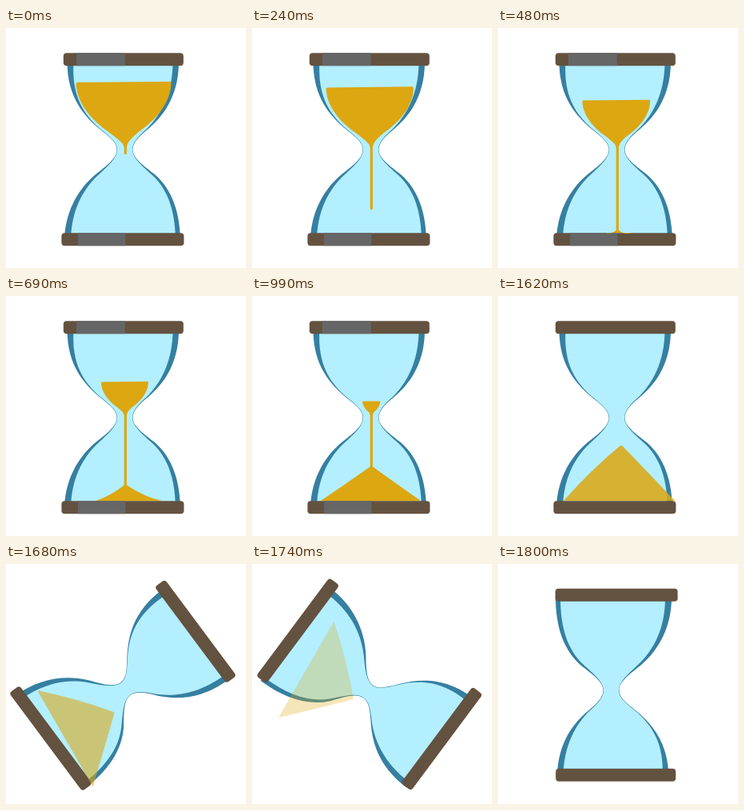
An HTML page with a canvas that plays this animation: 300 px wide and 300 px high, repeating every 1830 ms.

```html
<!DOCTYPE html>
<html lang="en">
<head>
<meta charset="utf-8">
<title>Hourglass</title>
<style>
html, body { margin: 0; width: 100%; height: 100%; overflow: hidden; background: #fff; }
canvas { display: block; width: 300px; height: 300px; }
</style>
</head>
<body>
<canvas id="stage" width="300" height="300"></canvas>
<script>
const ctx = document.getElementById('stage').getContext('2d');
const LOOP = 1830, STEP = 30, POUR_END = 1470, TURN = 1620;
const SAND = '#dca711', WATER = '#b3efff', TEAL = '#367fa1', WOOD = '#63523f', GREY = '#666666';
const NECK = 149.3, FLOOR = 256;

const outer = new Path2D(
  'M76.5 42C76.5 88 99 111 118 127C130 136.5 138.5 143 138.5 152C138.5 163 126 172 112 183C89 202 73 232 73 268' +
  'L218 268C218 232 208 202 186 183C172 172 158.5 163 158.5 152C158.5 143 167 135 178 126C194 112 216 88 216 42Z');
const inner = new Path2D(
  'M84.5 42C81.5 86 98 109 118.5 126.5C130.5 136.5 139 143 139 152C139 163 127 173 114.5 184.5C95 203 81 230 81 268' +
  'L212 268C212 230 203 203 183.5 184.5C171 173 158 163 158 152C158 143 166 135 176 126C192 110 208.5 84 208.5 42Z');

// Piecewise linear value through [time, value] pairs
function track(t, keys) {
  if (t <= keys[0][0]) return keys[0][1];
  for (let i = 1; i < keys.length; i++) {
    const [t0, a] = keys[i - 1], [t1, b] = keys[i];
    if (t <= t1) return a + (b - a) * (t - t0) / (t1 - t0);
  }
  return keys[keys.length - 1][1];
}

function turned(x, y, deg, draw) {
  ctx.save();
  ctx.translate(x, y);
  ctx.rotate(deg * Math.PI / 180);
  ctx.translate(-x, -y);
  draw();
  ctx.restore();
}

function glass() {
  ctx.fillStyle = TEAL;
  ctx.fill(outer);
  ctx.fillStyle = WATER;
  ctx.fill(inner);
}

function bar(x, y, w) {
  const h = 16, r = 4;
  ctx.fillStyle = WOOD;
  ctx.beginPath();
  ctx.moveTo(x + r, y);
  ctx.arcTo(x + w, y, x + w, y + h, r);
  ctx.arcTo(x + w, y + h, x, y + h, r);
  ctx.arcTo(x, y + h, x, y, r);
  ctx.arcTo(x, y, x + w, y, r);
  ctx.fill();
}

function bars() {
  bar(71.8, 31.2, 150);
  bar(69.4, 256.2, 153);
}

function shine() {
  ctx.fillStyle = GREY;
  ctx.fillRect(88, 31.2, 60.7, 16);
  ctx.fillRect(90, 256.2, 59.3, 16);
}

function upperSand(level) {
  const w = 59.5 - 0.757 * (level - 67.5);
  if (w <= 1.8) return;
  const h = 149 - level, mid = 147 + (level - 67.5) * 0.035;
  const tilt = 0.6 * w / 60;
  const y = k => level + k * h;
  const x = (side, k) => mid + side * k * w;
  ctx.fillStyle = SAND;
  ctx.beginPath();
  ctx.moveTo(x(1, .97), level - tilt);
  ctx.lineTo(x(-1, .97), level + tilt);
  ctx.quadraticCurveTo(x(-1, 1), level + tilt, x(-1, 1), y(.03));
  ctx.bezierCurveTo(x(-1, .98), y(.35), x(-1, .62), y(.61), x(-1, .34), y(.75));
  ctx.bezierCurveTo(x(-1, .15), y(.86), NECK - 2, y(.93), NECK - 1.8, y(1));
  ctx.lineTo(NECK + 1.8, y(1));
  ctx.bezierCurveTo(NECK + 2, y(.93), x(1, .15), y(.86), x(1, .34), y(.75));
  ctx.bezierCurveTo(x(1, .62), y(.61), x(1, .98), y(.35), x(1, 1), y(.03));
  ctx.quadraticCurveTo(x(1, 1), level - tilt, x(1, .97), level - tilt);
  ctx.fill();
}

function stream(top, tip) {
  if (tip <= top) return;
  ctx.strokeStyle = SAND;
  ctx.lineWidth = 3.2;
  ctx.lineCap = 'round';
  ctx.beginPath();
  ctx.moveTo(NECK, top + 1.6);
  ctx.lineTo(NECK, tip - 1.6);
  ctx.stroke();
}

function heap(left, right, peak, sagLeft, sagRight) {
  const ctrl = (x, sag) => [(x + NECK) / 2, (FLOOR + peak) / 2 + 2 * sag];
  ctx.fillStyle = SAND;
  ctx.beginPath();
  ctx.moveTo(left, FLOOR);
  ctx.quadraticCurveTo(...ctrl(left, sagLeft), NECK - 1, peak);
  ctx.lineTo(NECK + 1, peak);
  ctx.quadraticCurveTo(...ctrl(right, sagRight), right, FLOOR);
  ctx.fill();
}

function pour(t) {
  const peak = track(t, [[430, 256], [690, 236], [990, 213], [1350, 193], [1470, 187]]);
  upperSand(track(t, [[0, 67.5], [300, 75.5], [990, 131.5], [1200, 149]]));
  const top = track(t, [[0, 144], [1180, 146], [1350, 177.5], [1470, 200]]);
  stream(top, Math.min(158 + t * 0.2875, peak + 2));
  if (t > 430) {
    heap(
      track(t, [[430, 140], [690, 112], [990, 86], [1350, 82]]),
      track(t, [[430, 160], [690, 195], [990, 211], [1350, 212]]),
      peak,
      track(t, [[690, 2], [990, 0], [1350, -3]]),
      track(t, [[690, 2.5], [990, 0], [1350, -0.5]]));
  }
}

// The fallen heap, spread a little wider from its left foot
function looseHeap() {
  ctx.translate(82, 0);
  ctx.scale(1.07, 1);
  ctx.translate(-82, 0);
  heap(82, 212, 187, -3, -0.5);
}

function spin(t) {
  const step = (t - TURN) / STEP, u = step / 6;
  const eased = (u + u * u * (3 - 2 * u)) / 2;
  turned(145, 155, 180 * eased, glass);
  turned(147, 151.5, 180 * eased, bars);
  ctx.globalAlpha = Math.max(0, 1 - (step + 1) / 7);
  turned(145.4, 169.8, 180 * u, looseHeap);
  ctx.globalAlpha = 1;
}

function draw(t) {
  ctx.fillStyle = '#fff';
  ctx.fillRect(0, 0, 300, 300);
  if (t >= TURN) return spin(t);
  glass();
  bars();
  shine();
  pour(Math.min(t, POUR_END));
}

const start = performance.now();
function tick() {
  const t = (performance.now() - start) % LOOP;
  draw(Math.floor(t / STEP) * STEP);
  requestAnimationFrame(tick);
}
tick();
</script>
</body>
</html>
```
